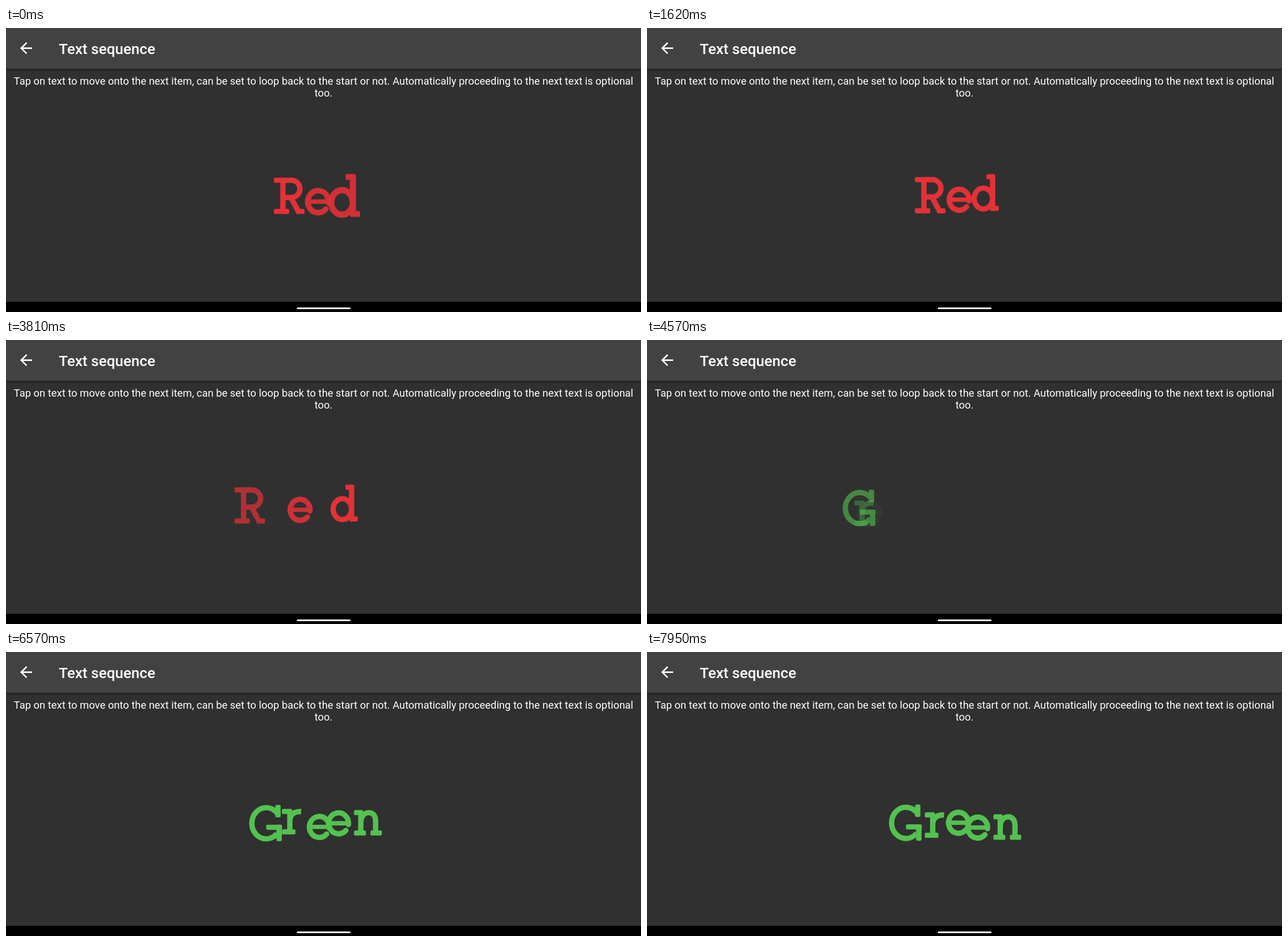
These frames come from a looping animation (1119 px wide and 501 px high, 7.99 s). An HTML page:

```html
<!DOCTYPE html>
<html lang="en">
<head>
<meta charset="utf-8">
<title>Text sequence</title>
<style>
  html, body { margin: 0; width: 100%; height: 100%; overflow: hidden; background: #303030; }
  svg { position: absolute; left: 0; top: 0; display: block; }
  header {
    position: absolute; left: 0; top: 0; width: 1119px; height: 72px;
    background: #424242; box-shadow: 0 2px 4px rgba(0, 0, 0, .42);
  }
  text { font-family: Roboto, sans-serif; fill: #fff; }
  .title { font-size: 26.1px; font-weight: 500; }
  .body { font-size: 18.4px; text-anchor: middle; }
  .letter path { fill: none; stroke: currentColor; stroke-width: 9.4; stroke-linejoin: round; }
  .letter rect { fill: currentColor; }
</style>
</head>
<body>
<header></header>
<svg id="stage" width="1119" height="501" viewBox="0 0 1119 501">
  <path transform="translate(19.7 19.8) scale(1.315)" fill="#fff"
    d="M20 11H7.83l5.59-5.59L12 4l-8 8 8 8 1.41-1.41L7.83 13H20z"/>
  <text class="title" x="93" y="45.5">Text sequence</text>
  <text class="body" x="559.5" y="100">Tap on text to move onto the next item, can be set to loop back to the start or not. Automatically proceeding to the next text is optional</text>
  <text class="body" x="559.5" y="121.3">too.</text>
  <rect y="483" width="1119" height="18" fill="#000"/>
  <rect x="512.5" y="493" width="94.5" height="3" rx="1.5" fill="#fff"/>
</svg>
<script>
const LOOP = 7990, WAVE = 765, TURN = 2 * Math.PI, RAD = Math.PI / 180;
const NS = 'http://www.w3.org/2000/svg';
const stage = document.getElementById('stage');

// Slab letters on a baseline at y = 0: stroked lines plus bars [x, y, w, h].
const GLYPHS = {
  R: { line: 'M16-4V-60M16-59.4H31a15 15.2 0 0 1 0 30.4H16M30-29L43-5',
       bars: [[0, -64, 30, 9], [0, -9, 27, 9], [39, -9, 15, 9]] },
  e: { line: 'M39.5-20A17.5 18.5 0 1 0 35-9.6', cap: 'round', bars: [[4, -26, 39, 7.6]] },
  d: { line: 'M37-61V-3M4.5-22a16.2 18.5 0 1 0 32.4 0a16.2 18.5 0 1 0-32.4 0',
       bars: [[26, -65, 15.6, 9], [33, -9, 15, 9]] },
  G: { line: 'M49-49.7A25.3 27.5 0 1 0 49-13.3',
       bars: [[46, -64, 9.5, 22], [30, -29, 28, 9], [48, -29, 9.5, 29]] },
  r: { line: 'M14-4V-41M14-25C15-36 22-41 34-40.3',
       bars: [[0, -45, 18, 9], [0, -9, 24, 9]] },
  n: { line: 'M12-4V-41M12-22C12-34 18-40.5 26-40.5S38-35 38-25V-4',
       bars: [[0, -45, 16, 9], [0, -9, 21, 9], [29, -9, 20, 9]] }
};

function add(parent, tag, attrs) {
  const el = document.createElementNS(NS, tag);
  for (const key in attrs) el.setAttribute(key, attrs[key]);
  return parent.appendChild(el);
}

function makeLetter(char, color) {
  const { line, cap = 'butt', bars } = GLYPHS[char];
  const g = add(stage, 'g', { class: 'letter', color });
  add(g, 'path', { d: line, 'stroke-linecap': cap });
  for (const [x, y, width, height] of bars) add(g, 'rect', { x, y, width, height, rx: 2.6 });
  return g;
}

const clamp = v => Math.min(1, Math.max(0, v));

const red = [['R', 472, 1], ['e', 528, 40], ['d', 572, 100]].map(([char, x, grow]) =>
  ({ el: makeLetter(char, '#e43137'), x, grow }));

// Each green letter drifts around its centre with its own phase in x and y.
const green = [
  ['G', 429.3, 295, -20], ['r', 487.2, 150, 112], ['e', 529, 330, 245],
  ['e', 562.5, 340, 75], ['n', 613.3, 310, 80]
].map(([char, x, phaseX, phaseY]) => ({ el: makeLetter(char, '#54c150'), x, phaseX, phaseY }));

function place(el, x, y, scale, opacity) {
  el.setAttribute('transform',
    `translate(${x + 24} ${y - 32}) scale(${scale}) translate(-24 32)`);
  el.setAttribute('opacity', opacity);
}

function drawRed(t) {
  const settle = clamp(t / 200);
  red.forEach(({ el, x, grow }, i) => {
    const wave = 4 * Math.sin((t - 1620) / WAVE * TURN + (47 - 32 * i) * RAD);
    const left = clamp(1 - t / grow);
    const out = clamp((t - 3700 - 60 * i) / 400);
    const y = 328 + (wave - 4) * settle;
    const scale = 1 + left * (i === 2 ? .17 : .05);
    place(el, x - 250 * out, y, scale, (1 - out) * (1 - .1 * left));
  });
}

function drawGreen(t) {
  const turn = (t - 5700) / WAVE * TURN;
  green.forEach(({ el, x, phaseX, phaseY }, i) => {
    const start = 4340 + 75 * i;
    const p = clamp((t - start) / 400);
    const drift = clamp((t - start - 350) / 200);
    const dx = 3 * drift * Math.sin(turn + phaseX * RAD);
    const dy = 6.5 * drift * Math.cos(turn + phaseY * RAD);
    place(el, x - 200 * (1 - p) + dx, 328 + dy, 1, clamp((p - .15) * 1.4));
  });
}

function draw() {
  const t = performance.now() % LOOP;
  drawRed(t);
  drawGreen(t);
  requestAnimationFrame(draw);
}
draw();
</script>
</body>
</html>
```
